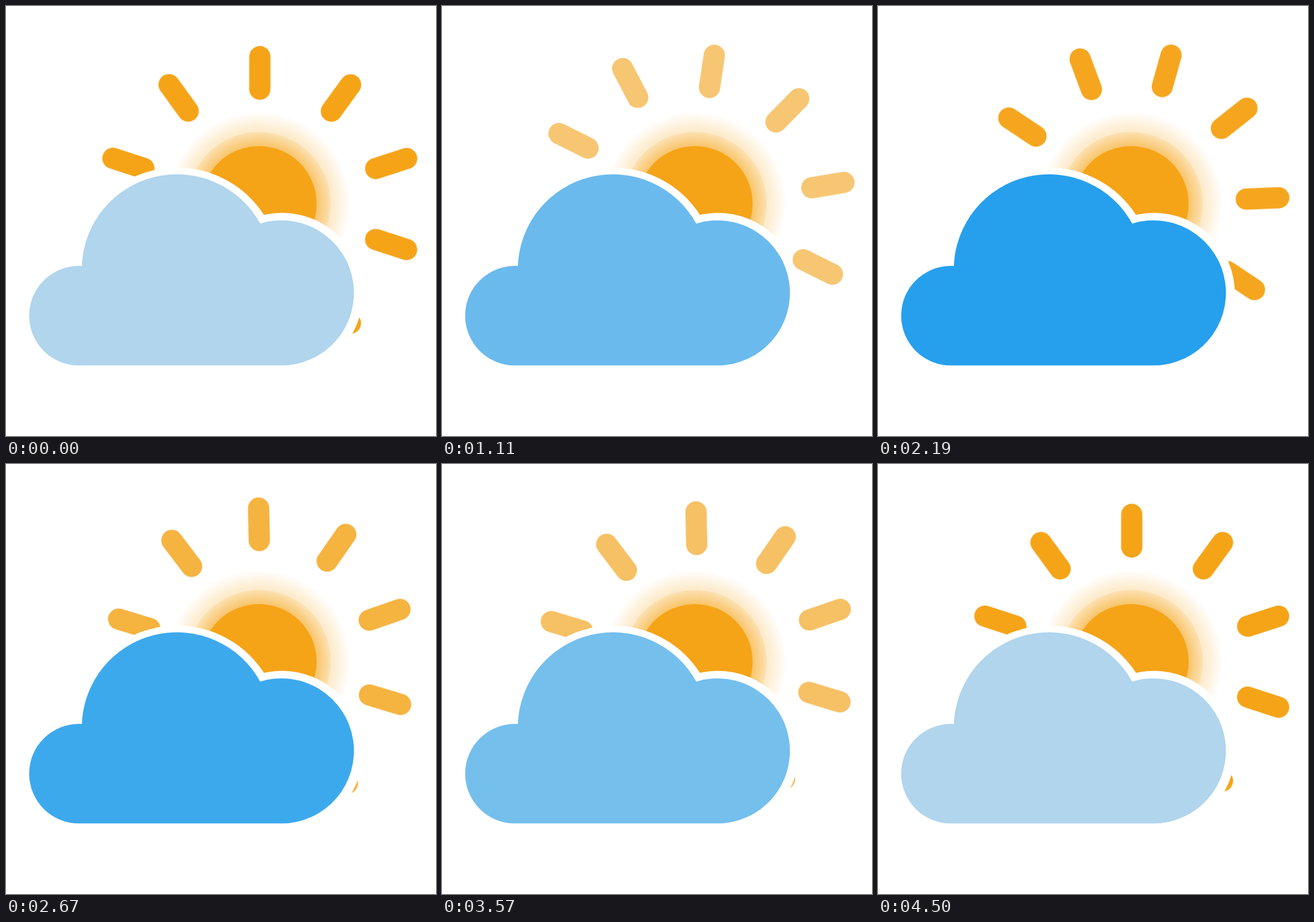
Recreate the animation shown at these times as an HTML page. Size 748 px wide and 748 px high, loop 4530 ms.

```html
<!DOCTYPE html>
<html lang="en">
<head>
<meta charset="utf-8">
<title>Sun behind a cloud</title>
<style>
  html, body { margin: 0; width: 100%; height: 100%; overflow: hidden; background: #fff; }
  svg { display: block; width: 100%; height: 100%; }

  /* 4.5 s of motion, then the last pose holds for 30 ms */
  #rays, #cloud { animation: 4530ms linear infinite; }
  #rays {
    stroke: #f5a418;
    stroke-width: 37;
    stroke-linecap: round;
    transform-origin: 0 0;
    animation-name: spin, glow;
  }
  #cloud { fill: #b0d5ed; animation-name: tint; }

  @keyframes spin {
    0% { transform: rotate(0deg); }
    99.338%, 100% { transform: rotate(180deg); }
  }
  @keyframes glow {
    0%, 49.669%, 99.338%, 100% { stroke: #f5a418; }
    26.821%, 72.517% { stroke: #f6c97b; }
  }
  @keyframes tint {
    0%, 99.338%, 100% { fill: #b0d5ed; }
    49.669% { fill: #229fed; }
  }
</style>
</head>
<body>
<svg viewBox="0 0 748 748">
  <defs>
    <radialGradient id="outer">
      <stop offset=".62" stop-color="#f5a418" stop-opacity=".26"/>
      <stop offset=".8" stop-color="#f5a418" stop-opacity=".22"/>
      <stop offset="1" stop-color="#f5a418" stop-opacity="0"/>
    </radialGradient>
    <radialGradient id="inner">
      <stop offset=".8" stop-color="#f5a418" stop-opacity=".52"/>
      <stop offset="1" stop-color="#f5a418" stop-opacity=".13"/>
    </radialGradient>
  </defs>

  <g transform="translate(441.4 344.1)"><g id="rays"></g></g>

  <g transform="translate(440 344)">
    <circle r="160" fill="url(#outer)"/>
    <circle r="125" fill="url(#inner)"/>
    <circle r="100.3" fill="#f5a418"/>
  </g>

  <g fill="#fff">
    <circle cx="297.5" cy="461" r="180"/>
    <circle cx="480" cy="500.5" r="140.8"/>
    <circle cx="127" cy="539" r="101"/>
    <path d="M127 480H480V641H127Z"/>
  </g>

  <path id="cloud" d="M126.8 625.3A86.6 86.6 0 0 1 126.8 452.1Q129.4 452.1 132 452.3A165.4 165.4 0 0 1 442.2 378.4A126.2 126.2 0 1 1 479 625.3Z"/>
</svg>
<script>
  const rays = document.getElementById('rays');

  // The rays sit on a slightly wide ellipse, each turned by its own angle.
  for (let deg = 0; deg < 360; deg += 36) {
    const ray = document.createElementNS('http://www.w3.org/2000/svg', 'path');
    const shift = 12.4 * Math.sin(deg * Math.PI / 180);
    ray.setAttribute('d', 'M0 -256.2V-199.6');
    ray.setAttribute('transform', `translate(${shift} .2) rotate(${deg})`);
    rays.append(ray);
  }
</script>
</body>
</html>
```
